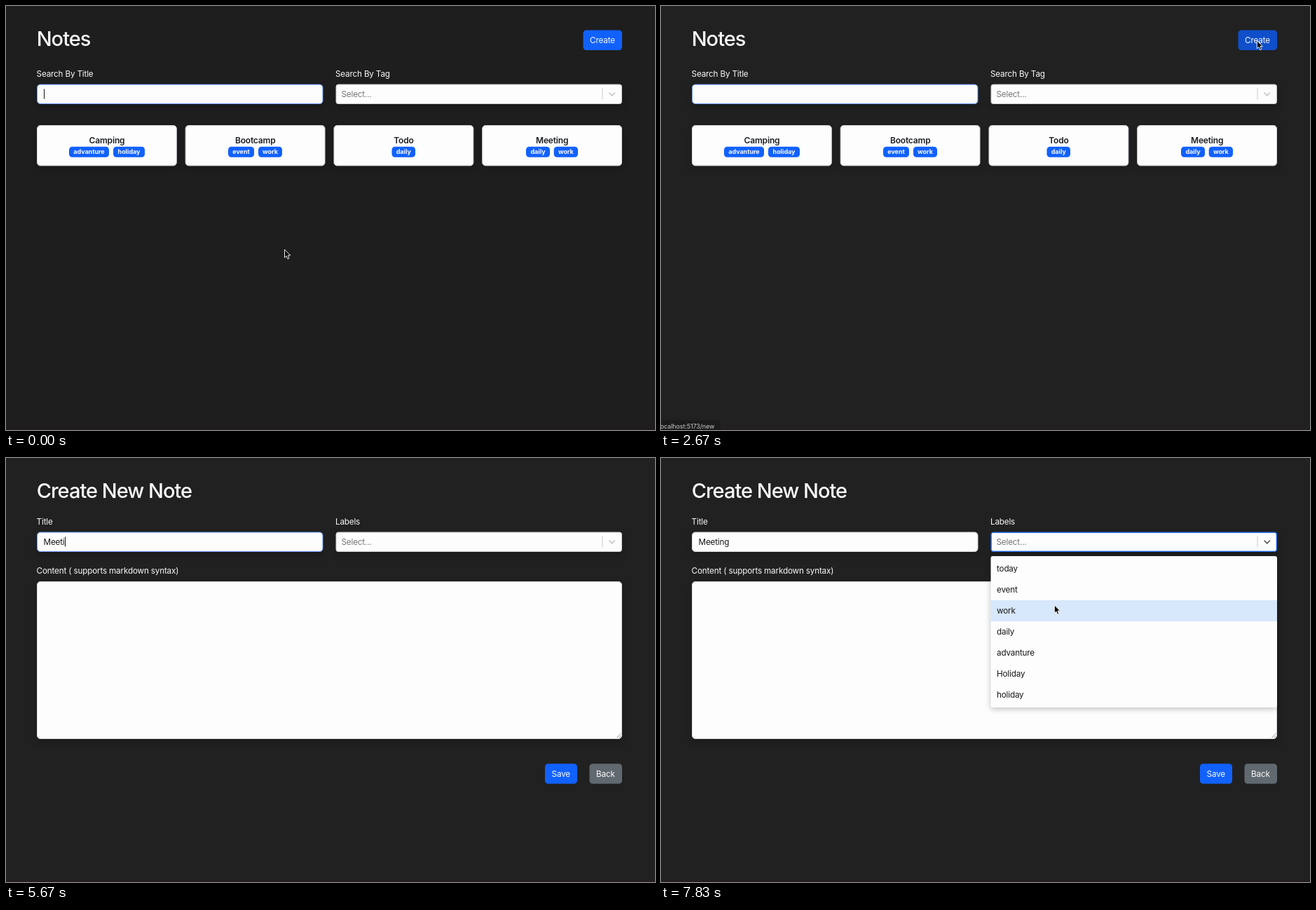
Animation, 926 px wide and 605 px high, one loop 8000 ms. Source, as an HTML page:

```html
<!DOCTYPE html>
<html lang="en">
<head>
<meta charset="utf-8">
<title>Notes</title>
<style>
html, body { margin: 0; width: 100%; height: 100%; overflow: hidden; background: #212121; }
svg { display: block; width: 926px; height: 605px; }
text { font: 400 11.7px Inter, Roboto, sans-serif; font-optical-sizing: none; letter-spacing: -.17px; fill: #fafafa; white-space: pre; }
.h1 { font-size: 29px; font-weight: 500; letter-spacing: -1px; }
.name { font-size: 12px; font-weight: 600; letter-spacing: -.17px; fill: #1b1e22; text-anchor: middle; }
.tag { font-size: 9px; font-weight: 700; letter-spacing: -.05px; text-anchor: middle; }
.dark { fill: #161616; }
.hint { fill: #757575; }
.status { font-size: 9px; letter-spacing: -.13px; fill: #c9c9c9; }
.raised { filter: drop-shadow(0 5px 5px rgba(0, 0, 0, .17)); }
.menu { filter: drop-shadow(0 2px 4px rgba(0, 0, 0, .25)); }
</style>
</head>
<body>
<svg id="stage" viewBox="0 0 926 605"></svg>
<script>
const stage = document.getElementById('stage');
const TICKS = 48, LOOP = 8000;
const PAPER = '#fdfdfd', BLUE = '#1161fe', LINE = '#d5d8dc', FOCUS = '#5f95f5';

const cards = [
  [44, 'Camping', [[90, 57, 'advanture'], [153, 45, 'holiday']]],
  [255.7, 'Bootcamp', [[317, 37, 'event'], [360, 34, 'work']]],
  [467.5, 'Todo', [[550.5, 33.5, 'daily']]],
  [679.2, 'Meeting', [[742, 34, 'daily'], [781.7, 34.3, 'work']]]
];
const options = ['today', 'event', 'work', 'daily', 'advanture', 'Holiday', 'holiday'];
const keyTicks = [27, 30, 31, 33, 34, 36, 37];

const text = (x, y, s, cls = '') => `<text x="${x}" y="${y}" class="${cls}">${s}</text>`;
const rect = (x, y, w, h, r, fill, more = '') =>
  `<rect x="${x}" y="${y}" width="${w}" height="${h}" rx="${r}" fill="${fill}" ${more}/>`;
const box = (x, y, w, h, stroke = LINE, r = 4.5) =>
  rect(x + .5, y + .5, w - 1, h - 1, r, PAPER, `stroke="${stroke}" class="raised"`);
const button = (x, y, w, label, fill) =>
  rect(x, y, w, 28.5, 4.5, fill) + text(x + 9.6, y + 18.5, label);

function input(y, focused, value = '', caret = false) {
  return box(44, y, 408.5, 28.5, focused ? FOCUS : LINE) +
    `<text id="value" x="53.5" y="${y + 18.3}" class="dark">${value}</text>` +
    (caret ? `<rect id="caret" x="54" y="${y + 7}" width="1" height="14" fill="#111"/>` : '');
}

function select(y, open) {
  return box(470.5, y, 408.5, 28.5, open ? '#2469ea' : '#ccc', 3) +
    (open ? rect(471.2, y + .9, 407, 26.7, 2.5, 'none', 'stroke="#2469ea"') : '') +
    text(478.5, y + 18.3, 'Select...', 'hint') +
    rect(850.5, y + 6, 1, 16, 0, '#ccc') +
    `<path d="M861 ${y + 12.5}l3.8 3.8 3.8-3.8" fill="none" stroke="${open ? '#555' : '#c4c4c4'}" stroke-width="1.6" stroke-linecap="round"/>`;
}

function card([x, name, tags]) {
  return box(x, 170, 199.8, 58.3) + text(x + 100, 196, name, 'name') +
    tags.map(([tx, w, s]) => rect(tx, 200.7, w, 15, 4.5, BLUE) + text(tx + w / 2, 211.4, s, 'tag')).join('');
}

function listPage(k) {
  const caret = Math.floor((k + 1) / 3) % 2 === 0;
  return text(43.7, 57, 'Notes', 'h1') +
    button(823.5, 34.5, 55.5, 'Create', k >= 13 ? '#104fcb' : BLUE) +
    text(43.6, 101, 'Search By Title') + text(470, 101, 'Search By Tag') +
    input(111.5, true, '', caret) + select(111.5, false) + cards.map(card).join('');
}

function menu(active) {
  return rect(470.5, 140, 408.5, 216, 3, PAPER, 'class="menu"') +
    rect(470.5, 143 + active * 30, 408.5, 30, 0, '#d7e7fc') +
    options.map((s, i) => text(479, 162.2 + i * 30, s, 'dark')).join('');
}

function formPage(k) {
  const typed = 'Meeting'.slice(0, keyTicks.filter(t => t <= k).length);
  const open = k >= 43, focused = k >= 23 && !open;
  const caret = focused && k !== 26 && k < 40;
  return text(43.7, 57, 'Create New Note', 'h1') +
    text(43.6, 95, 'Title') + text(470, 95, 'Labels') +
    input(105.5, focused, typed, caret) + select(105.5, open) +
    text(43.6, 165.3, 'Content ( supports markdown syntax)') +
    box(44, 176, 835, 225) +
    '<path d="M871.5 399l6-6M875 399l2.5-2.5" stroke="#777" stroke-width=".8"/>' +
    button(769, 436.3, 46, 'Save', BLUE) + button(832.5, 436.3, 46.5, 'Back', '#616970') +
    (open ? menu(Math.max(0, k - 45)) : '');
}

const shapes = {
  arrow: '<path d="M0 0V11.5L2.6 9.2 4.5 13.4 6.5 12.5 4.7 8.4H8.2Z" fill="#0c0c0c" stroke="#fff" stroke-width=".9"/>',
  cross: '<path d="M-5.5 0H5.5M0-5.5V5.5" stroke="#f4f4f4" stroke-width="3.4"/><path d="M-4.6 0H4.6M0-4.6V4.6" stroke="#222" stroke-width="1.4"/>',
  beam: '<path d="M-2.5-7Q0-7 0-5V5Q0 7-2.5 7M2.5-7Q0-7 0-5V5Q0 7 2.5 7" fill="none" stroke="#222"/>'
};

// Eased travel between two points while k runs from k0 to k1
function glide(k, k0, k1, [ax, ay], [bx, by]) {
  const p = Math.min(1, Math.max(0, (k - k0) / (k1 - k0)));
  const e = p * p * (3 - 2 * p);
  return [ax + (bx - ax) * e, ay + (by - ay) * e];
}

function pointer(k) {
  const home = [397.5, 347.5], create = [850.3, 49.3], title = [250, 120], pick = [553, 113];
  if (k < 1) return ['arrow', home];
  if (k < 7) return ['cross', [397.5, 348.7]];
  if (k < 17) return ['arrow', glide(k, 6, 14, home, create)];
  if (k < 27) return [k < 22 ? 'arrow' : 'beam', glide(k, 17, 22, create, title)];
  if (k < 40) return null;
  if (k < 46) return ['arrow', glide(k, 40, 44, [528.3, 111.8], pick)];
  return ['arrow', k < 47 ? [557, 172] : [561.3, 209.8]];
}

function draw(k) {
  const cursor = pointer(k);
  stage.innerHTML = rect(0, 0, 926, 605, 0, k < 1 ? '#1e1e1e' : '#212121') +
    (k < 17 ? listPage(k) : formPage(k)) +
    rect(0, 603.5, 926, 1.5, 0, '#261a1f') +
    (k >= 16 && k < 20 ? rect(-5, 591, 90, 18, 4, '#1b1b1b') + text(-1, 603, 'ocalhost:5173/new', 'status') : '') +
    (cursor ? `<g transform="translate(${cursor[1]})">${shapes[cursor[0]]}</g>` : '');
  const caret = document.getElementById('caret');
  if (caret) caret.setAttribute('x', 54 + document.getElementById('value').getComputedTextLength());
}

let shown = -1;
const start = performance.now();
function frame(now) {
  const t = Math.max(0, now - start) % LOOP;
  // Small lead keeps rounded frame times on the right side of each step
  const k = Math.min(TICKS - 1, Math.floor((t + 4) * TICKS / LOOP));
  if (k !== shown) draw(shown = k);
  requestAnimationFrame(frame);
}
frame(start);
</script>
</body>
</html>
```
